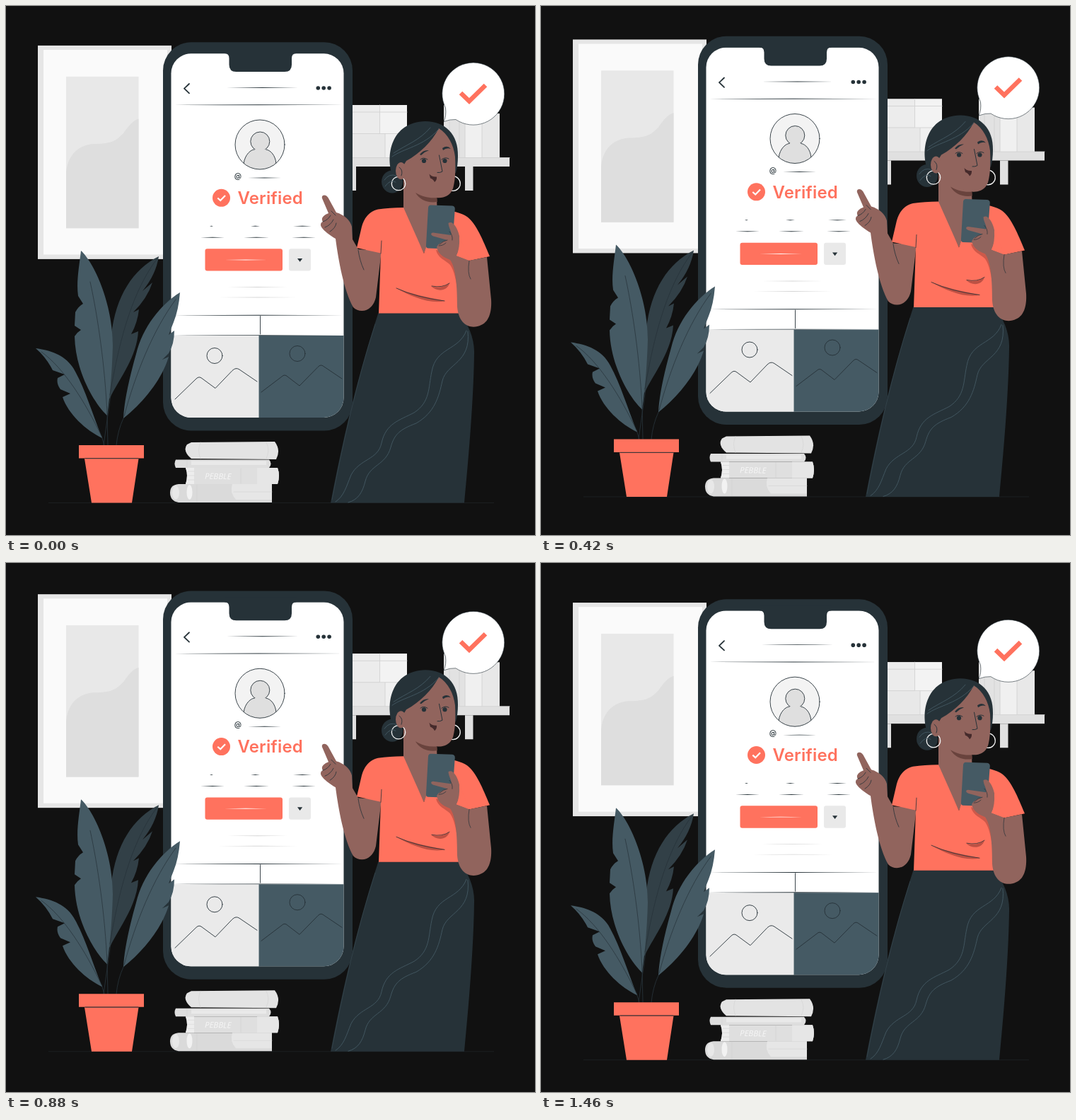
An HTML page for the animation above (1.5 s loop, 748x748 px).

```html
<!DOCTYPE html>
<html lang="en">
<head>
<meta charset="utf-8">
<title>Verified profile</title>
<style>
html, body { margin: 0; width: 100%; height: 100%; overflow: hidden; background: #111; }
svg { display: block; width: 100vw; height: 100vh; }
.coral { fill: #ff725e; }
.ink { fill: #263238; }
.slate { fill: #455a64; }
.skin { fill: #91645d; }
.line { fill: none; stroke: #263238; stroke-width: .9; stroke-linejoin: round; stroke-linecap: round; }
.soft { stroke: #455a64; }
.pale { stroke: #d2d2d2; }
</style>
</head>
<body>
<svg viewBox="0 0 748 748">
<defs>
  <clipPath id="screenClip"><rect x="233.500" y="67.300" width="244" height="514.700" rx="28"/></clipPath>
  <clipPath id="avatarClip"><circle cx="359" cy="196" r="35"/></clipPath>
</defs>
<g id="scene">
  <!-- floor -->
  <path d="M60 702.500H690" stroke="#1b1f21"/>

  <!-- wall picture -->
  <rect x="45" y="55.900" width="189" height="302" fill="#e6e6e6"/>
  <rect x="53" y="62" width="175" height="289.500" fill="#fafafa"/>
  <rect x="85" y="99.800" width="102.500" height="214.400" fill="#e8e8e8"/>
  <path d="M85 235C88 208 105 196 124 195C150 195 156 190 166 180C173 170 179 162 187.500 159.500V314.200H85Z" fill="#dedede"/>

  <!-- shelf -->
  <rect x="480" y="140" width="87" height="75" fill="#e8e8e8"/>
  <path d="M480 140H528.500V180H480Z" fill="#ececec"/>
  <path d="M528.500 140H567V181H528.500Z" fill="#f3f3f3"/>
  <path d="M536 181H567V215H536Z" fill="#f0f0f0"/>
  <path class="line pale" d="M490 150H567M490 180.500H567M528.500 140V180M536 181V215"/>
  <rect x="619" y="140" width="30" height="75" fill="#e2e2e2"/>
  <rect x="649" y="148" width="24" height="67" fill="#f0f0f0"/>
  <rect x="673" y="152" width="25" height="63" fill="#e8e8e8"/>
  <path class="line pale" d="M627 150V214M641 150V214M649 150V214M673 152V214"/>
  <rect x="480" y="214.500" width="232" height="12.500" fill="#e0e0e0"/>
  <path d="M484 227H495V261H484ZM649 227H660.500V261H649Z" fill="#e0e0e0"/>
  <path class="line pale" d="M490 214.500H712"/>

  <!-- speech bubble -->
  <path d="M621.500 144A44 44 0 1 1 636 160.500Q628 160 619 163.500Q623 155 621.500 144Z" fill="#fff" stroke="#263238" stroke-width=".6"/>
  <path d="M643 123L655 134.500L678 112" fill="none" stroke="#ff725e" stroke-width="6.500"/>

  <!-- big phone -->
  <rect class="ink" x="222" y="51.200" width="268" height="549.300" rx="40"/>
  <g clip-path="url(#screenClip)">
    <rect x="233" y="67" width="245" height="516" fill="#fff"/>
    <rect x="233" y="466" width="124.500" height="117" fill="#eaeaea"/>
    <rect class="slate" x="357.500" y="466" width="121" height="117"/>
    <g class="line">
      <circle cx="295" cy="494.500" r="11"/>
      <path d="M239 556L269 527Q273 523 277 526.500L296 540.500L320 515.500Q325 510.500 330 514L355 531"/>
      <circle cx="412" cy="491.500" r="11"/>
      <path d="M361 546L390 524Q394 520 398 524L415 537L441 510.500Q445 506 449 509.500L475 527"/>
    </g>
  </g>
  <path class="ink" d="M309 60V67Q315.500 67 315.500 74V83Q315.500 93 325.500 93H394Q404 93 404 83V74Q404 67 410.500 67V60Z"/>
  <path class="line" style="stroke-width:1.800" d="M259 110L252 116.700L259 123.300"/>
  <g class="ink"><circle cx="441.300" cy="116" r="2.800"/><circle cx="449.200" cy="116" r="2.800"/><circle cx="457.100" cy="116" r="2.800"/></g>
  <circle cx="359" cy="196" r="35" fill="#f3f3f3"/>
  <g clip-path="url(#avatarClip)">
    <path d="M336 232V223C338 209 347 203 351 203H368C374 204 381 211 382 223V232Z" fill="#dfdfdf" stroke="#263238" stroke-width=".9"/>
    <circle cx="359.300" cy="191.500" r="13.500" fill="#dfdfdf" stroke="#263238" stroke-width=".9"/>
    <path d="M351.500 202.500H367.500V207H351.500Z" fill="#dfdfdf"/>
  </g>
  <circle class="line" cx="359" cy="196" r="35"/>
  <text class="ink" x="322.800" y="244" font-family="Inter, sans-serif" font-size="10.500" font-weight="500">@</text>
  <circle class="coral" cx="304.500" cy="271.300" r="12.500"/>
  <path d="M299.300 271.500L303.200 275L310 268" fill="none" stroke="#fff" stroke-width="2.200"/>
  <text class="coral" x="327.500" y="280" font-family="Inter, sans-serif" font-size="24" font-weight="600" letter-spacing=".15">Verified</text>
  <rect class="coral" x="281.500" y="343.200" width="109.500" height="31.300" rx="3"/>
  <rect x="400" y="343.200" width="31" height="31.300" rx="3" fill="#e9e9e9"/>
  <path class="ink" d="M412 357H419.200L415.600 361.800Z"/>
  <path class="line" d="M359.500 438.500V464"/>
  <g id="rules"></g>

  <!-- plant -->
  <g class="line"><path d="M143 575L144 621M148 550L138 621M166 583Q158 600 156 621M135 608L139 621"/></g>
  <path d="M216 354C180 372 155 410 149 465C147 500 146 530 146 556C160 527 185 497 187 460L177 464Q186 448 188 429L180 433Q200 413 207 391L193 403Q212 380 216 354Z" fill="#324047"/>
  <g class="slate">
    <path d="M106 346C124 362 151 420 151 480C150 520 146 560 143 579C123 560 98 515 97 467Q101 461 106 458L97 452L98 433Q102 425 109 421L102 410C99 390 104 365 106 346Z"/>
    <path d="M246 405Q244 430 237 447L230 465L238 459Q238 478 230 491L221 500L230 496C221 527 195 560 166 583C167 560 174 527 184 492C193 454 219 422 246 405Z"/>
    <path d="M42 484C65 487 87 495 98 517C112 542 123 579 136 611C113 600 88 577 80 553L91 548L77 542Q71 534 73 526L83 521L66 515Q57 497 42 484Z"/>
  </g>
  <g class="line" style="stroke-width:.7">
    <path d="M119 390C130 440 140 510 143 577M213 358C182 400 162 460 147 550M240 415C208 458 183 520 167 580M50 489C82 512 112 560 135 608"/>
  </g>
  <path class="coral" d="M103 621H195V639.500H103ZM111 640H187.500L178 702.500H121Z"/>
  <path class="line" d="M112 639.800H187"/>

  <!-- books -->
  <path d="M262 617L380 616Q389 628 382 641L262 640Q249 629 256 620Z" fill="#e3e3e3"/>
  <path d="M240 641.500H372Q377 647 372 653H240Q237 647 240 641.500Z" fill="#dedede"/>
  <path d="M262 643.500H368V649H262Z" fill="#e9e9e9"/>
  <path d="M254 653H384Q388 664 384 676H254Q258 664 254 653Z" fill="#dfdfdf"/>
  <path d="M254 653H266V676H254Q258 664 254 653Z" fill="#ededed"/>
  <path d="M355 653H384Q388 664 384 676H355Z" fill="#e6e6e6"/>
  <path d="M244 676H376V702H244Q232 700 232 688Q232 677 244 676Z" fill="#dadada"/>
  <path d="M320 676H376V698H325Q316 688 320 676Z" fill="#e6e6e6"/>
  <ellipse cx="259.500" cy="687.500" rx="4" ry="10.500" fill="#f2f2f2"/>
  <ellipse cx="240" cy="688" rx="5" ry="10" fill="#e8e8e8"/>
  <g class="line pale" style="stroke-width:.6">
    <path d="M275 617Q270 628 275 640M368 617Q374 628 368 640M256 643V652M257 658H266M257 664H266M257 670H266M322 687H376M270 677V701M332 654V675"/>
  </g>
  <text x="281" y="669" transform="rotate(1 300 665)" font-family="Open Sans, sans-serif" font-size="11.500" font-style="italic" fill="#f6f6f6">PEBBLE</text>

  <!-- skirt -->
  <path class="ink" d="M526.500 434H640.500C654 449 663 472 662 492C661 560 654 640 648 702.500H459C475 620 495 530 526.500 434Z"/>
  <g class="line soft">
    <path d="M651 459C640 488 608 482 602 517C597 540 600 560 577 575C556 586 537 590 531 618C526 642 500 640 488 663C481 680 478 693 466 701"/>
    <path d="M653 460C658 505 623 505 617 530C612 553 606 575 580 590C556 599 549 606 544 624C537 650 514 648 508 672C504 688 498 698 484 702"/>
    <path d="M522 450C496 530 476 620 461 698" stroke-width=".4"/>
  </g>

  <!-- head -->
  <ellipse class="ink" cx="546" cy="248.500" rx="15" ry="16"/>
  <circle cx="632" cy="251" r="10.300" fill="none" stroke="#f2f2f2" stroke-width="1.300"/>
  <path class="ink" d="M546 238C537 212 544 164 593 163C621 163 640 182 639 212Q639 226 636 236L570 245Z"/>
  <path class="skin" d="M612 173C625 181 633 196 635 213C636 233 635 248 632 258C628 269 618 272 609 271L610 300L591 350L562 290V245L558 232L566 219C586 208 602 192 612 173Z"/>
  <circle cx="555" cy="251" r="9.700" fill="none" stroke="#f2f2f2" stroke-width="1.300"/>
  <ellipse class="skin" cx="558.500" cy="233" rx="7.500" ry="12"/>
  <path d="M579 264C589 270 599 272 609.500 271L609.800 277C596 279 585 274 579 264Z" fill="#69433d"/>
  <path class="line" d="M556 228Q562 232 559 240" stroke-width=".7"/>
  <g class="line soft">
    <path d="M546 213C562 201 590 199 612 174M548 208C566 196 585 190 600 172M535 246Q542 236 552 240M536 255Q544 244 551 249"/>
  </g>
  <g class="ink">
    <circle cx="591" cy="219" r="3.100"/><circle cx="620.500" cy="219" r="3.100"/>
    <path d="M585 210Q590 203 598 204Q592 206 587 211ZM617 201Q624 196 629 202Q623 200 618 204Z"/>
  </g>
  <path class="line" style="stroke-width:1" d="M586 217Q590 213 596 217M616 217Q621 213 626 216M612.500 211L617 234Q614 236 610 235.500"/>
  <path d="M598.500 237.500Q602 242 609 241.500Q609.500 246 606 249Q604 244.500 600 243.500Z" fill="#452a2b"/>

  <!-- arms and blouse -->
  <path class="skin" d="M447 272C445.500 267 452 265.500 455.500 271L467 292C478 295 487 303 489 312L490 330L498 344L531 346L523 412C518 433 500 435 491 426C478 403 470 360 466 329C457 324 444 314 445 309Q445 306 448 305C445 301 448 296 456 293Z"/>
  <path class="coral" d="M526 287.500Q542 285 562 285L591 350L612 287Q640 290 652 298C665 308 674 330 684 354L656 360L637 365L640.500 434.500H527L530 349.500L496 342L503 312C507 298 515 290 526 287.500Z"/>
  <path class="line" style="stroke-width:.8" d="M531 332L530 350M498 345Q500 360 506 373M448 305Q455 303 459 296M451 313Q459 310 463 302M458 319Q466 314 467 307M460 290L466 296"/>
  <path d="M552 399C575 408 596 412 621 417C600 422 573 411 552 399ZM601 396C612 400 622 396 627 392C624 403 610 405 601 396Z" fill="#bd5144"/>
  <path class="line" style="stroke-width:.8" d="M552 399Q580 412 620 417M602 396Q617 399 627 392"/>
  <path d="M608 345C610 356 622 360 628 366C634 375 636 387 638 399L640 370L632 350Z" fill="#cd594a"/>
  <path class="slate" d="M600.500 281.500L631 282.500Q635 283 634.800 287L631 339Q630.500 343.500 626.500 343.500L596.500 342.500Q593.500 342 594 338L597 285Q597.500 281.500 600.500 281.500Z"/>
  <path class="skin" d="M609 341C611 352 621 356 628 359C636 370 638 395 638 425C640 452 658 458 672 451C684 446 687 430 686 415L680 355L655 360L637 353C641 345 643 335 641 325C638 312 631 303 625.500 307C626 315 631 319 629 324L604 320.500C599 321 601 325 606 326L624 331Q612 334 609 341Z"/>
  <path class="coral" d="M641 325L655 359.500L637 353Q642 343 641 325Z"/>
  <path class="line" style="stroke-width:.7" d="M655 360Q652 378 657 386M627 319Q632 324 631 331M624 331Q618 332 613 337M612 339Q618 339 622 335"/>
</g>
</svg>
<script>
const scene = document.getElementById('scene');
const rules = document.getElementById('rules');
const INK = '#263238', PALE = '#d4d4d4';

// Hairlines that taper towards both ends: left, right, y, colour.
const hairlines = [
  [312, 413, 115.5, INK], [238, 477, 139.8, INK], [342, 389, 243, INK],
  [288, 293, 311.3, INK], [346, 359, 311.3, INK], [406, 432, 311.3, INK],
  [275, 309, 327.3, INK], [336, 372, 327.3, INK], [404, 438, 327.3, INK],
  [309, 369, 359, '#fff'], [313, 398, 397.5, PALE], [300, 412, 412, PALE],
  [238, 477, 437.3, INK], [236, 477, 465.6, INK]
];
rules.innerHTML = hairlines.map(([a, b, y, color]) => {
  const mid = (a + b) / 2;
  return `<path d="M${a} ${y}Q${mid} ${y - 0.9} ${b} ${y}Q${mid} ${y + 0.9} ${a} ${y}Z" fill="${color}"/>`;
}).join('');

// The scene floats up and down at constant speed, 24 steps a second.
const LOOP = 1500, STEPS = 36, TOP = 17.4, RISE = 0.85;
const stepStart = k => Math.round(k * 25 / 6) * 10;

function draw(now) {
  const t = now % LOOP;
  let k = STEPS - 1;
  while (k > 0 && stepStart(k) > t) k--;
  const y = RISE * (Math.abs(k - TOP) - TOP);
  scene.setAttribute('transform', `translate(0 ${y.toFixed(2)})`);
}

const begin = performance.now();
function tick() {
  draw(performance.now() - begin);
  requestAnimationFrame(tick);
}
tick();
</script>
</body>
</html>
```
